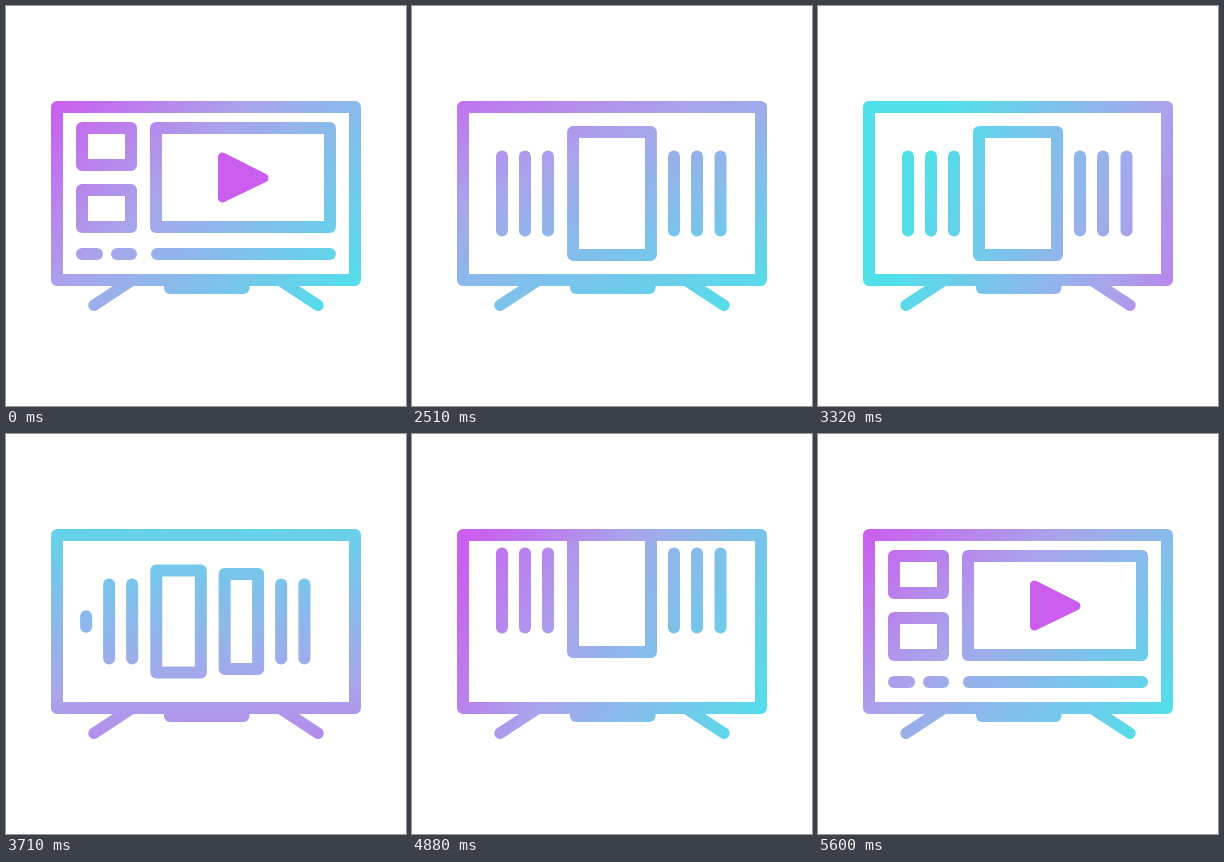
An HTML page with a canvas for the animation above (5630 ms loop, 400 px wide and 400 px high).

```html
<!DOCTYPE html>
<html lang="en">
<head>
<meta charset="utf-8">
<title>TV screen</title>
<style>
  html, body { margin: 0; width: 100%; height: 100%; overflow: hidden; background: #fff; }
  canvas { display: block; width: 400px; height: 400px; }
</style>
</head>
<body>
<canvas id="stage"></canvas>
<script>
const LOOP = 5630;
const canvas = document.getElementById('stage');
const ctx = canvas.getContext('2d');
const dpr = window.devicePixelRatio || 1;
canvas.width = canvas.height = 400 * dpr;

const clamp = v => Math.min(1, Math.max(0, v));
const span = (t, start, length) => clamp((t - start) / length);
const mix = (a, b, p) => a + (b - a) * p;
const easeOut = p => 1 - (1 - p) ** 3;
const easeSine = p => (1 - Math.cos(Math.PI * p)) / 2;

// Cubic bezier (.33, 0, .4, 1), solved by bisection
function easeSpin(x) {
  let lo = 0, hi = 1, s = 0.5;
  for (let i = 0; i < 24; i++) {
    s = (lo + hi) / 2;
    const r = 1 - s;
    if (0.99 * s * r * r + 1.2 * s * s * r + s ** 3 < x) lo = s; else hi = s;
  }
  return 3 * s * s - 2 * s ** 3;
}

function setPaint(t) {
  const angle = (45 + 360 * easeSpin(span(t, 2030, 3600))) * Math.PI / 180;
  const dx = Math.cos(angle), dy = Math.sin(angle);
  const x = 249, y = 187;
  const g = ctx.createLinearGradient(x - 206 * dx, y - 206 * dy, x + 144 * dx, y + 144 * dy);
  g.addColorStop(0, '#cb5eee');
  g.addColorStop(0.4, '#a8a5eb');
  g.addColorStop(1, '#50e0ea');
  ctx.strokeStyle = ctx.fillStyle = g;
}

// Rounded outline given by its centre and outer size
function box(cx, cy, w, h) {
  const line = Math.min(12, w, h);
  if (line < 0.5) return;
  const hw = Math.max(0.01, (w - line) / 2);
  const hh = Math.max(0.01, (h - line) / 2);
  ctx.lineWidth = line;
  ctx.beginPath();
  ctx.moveTo(cx - hw, cy - hh);
  ctx.lineTo(cx + hw, cy - hh);
  ctx.lineTo(cx + hw, cy + hh);
  ctx.lineTo(cx - hw, cy + hh);
  ctx.closePath();
  ctx.stroke();
}

function line(x1, y1, x2, y2) {
  ctx.beginPath();
  ctx.moveTo(x1, y1);
  ctx.lineTo(x2, y2);
  ctx.stroke();
}

function drawTv() {
  box(200, 187.5, 310, 185);
  ctx.lineWidth = 11.5;
  line(88, 299.3, 125, 275);
  line(312, 299.3, 275, 275);
  ctx.beginPath();
  ctx.roundRect(158, 272, 85.5, 16, 6);
  ctx.fill();
}

const panels = [
  [70, 116, 61, 49], [70, 178, 61, 49], [144, 116, 186, 111],
  [70, 242, 27, 12], [105, 242, 26, 12], [145, 242, 185, 12]
];

function drawMenu(grow) {
  for (const [x, y, w, h] of panels) box(x + w / 2, y + h / 2, w * grow, h * grow);
  ctx.save();
  ctx.translate(237, 171.5);
  ctx.scale(grow, grow);
  ctx.lineWidth = 9;
  ctx.beginPath();
  ctx.moveTo(-20.5, -20.5);
  ctx.lineTo(21, 0.5);
  ctx.lineTo(-20.5, 20.5);
  ctx.closePath();
  ctx.fill();
  ctx.stroke();
  ctx.restore();
}

const slots = [67, 90, 113, 136, 200, 262, 285, 308.5];
const MID = 4;

// p moves every item one slot to the right
function drawCovers(p, grow) {
  slots.forEach((x, i) => {
    const next = i < 7 ? slots[i + 1] : x;
    const front = i === MID ? 1 - p : i === MID - 1 ? p : 0;
    let h = mix(86, 135, front);
    if (i === 0) h = 86 - 148 * (1 - p);
    if (i === 7) h = 86 * (1 - 2 * p);
    h *= grow;
    if (h < 6) return;
    box(mix(x, next, p), 187.5, mix(12, 90, front) * (front ? grow : 1), h);
  });
}

function drawScreen(t) {
  ctx.save();
  ctx.beginPath();
  ctx.rect(57, 107, 286, 162);
  ctx.clip();

  if (t < 2345) {
    ctx.save();
    ctx.translate(275 * span(t, 2000, 340) ** 2, 0);
    drawMenu(1);
    ctx.restore();
  }
  if (t >= 2220 && t < 5270) {
    const start = t < 3320 ? 2690 : 3410;
    const p = easeSine(span(t, start, 550)) % 1;
    ctx.save();
    ctx.translate(0, -31 * (Math.max(0, t - 4340) / 540) ** 3);
    drawCovers(p, easeOut(span(t, 2220, 330)));
    ctx.restore();
  }
  if (t >= 5140) drawMenu(easeOut(span(t, 5140, 460)));
  ctx.restore();
}

function render(now) {
  const t = now % LOOP;
  ctx.setTransform(dpr, 0, 0, dpr, 0, 0);
  ctx.fillStyle = '#fff';
  ctx.fillRect(0, 0, 400, 400);
  ctx.lineCap = ctx.lineJoin = 'round';
  setPaint(t);
  drawTv();
  drawScreen(t);
}

let origin;
function tick(now) {
  origin ??= now;
  render(now - origin);
  requestAnimationFrame(tick);
}
render(0);
requestAnimationFrame(tick);
</script>
</body>
</html>
```
